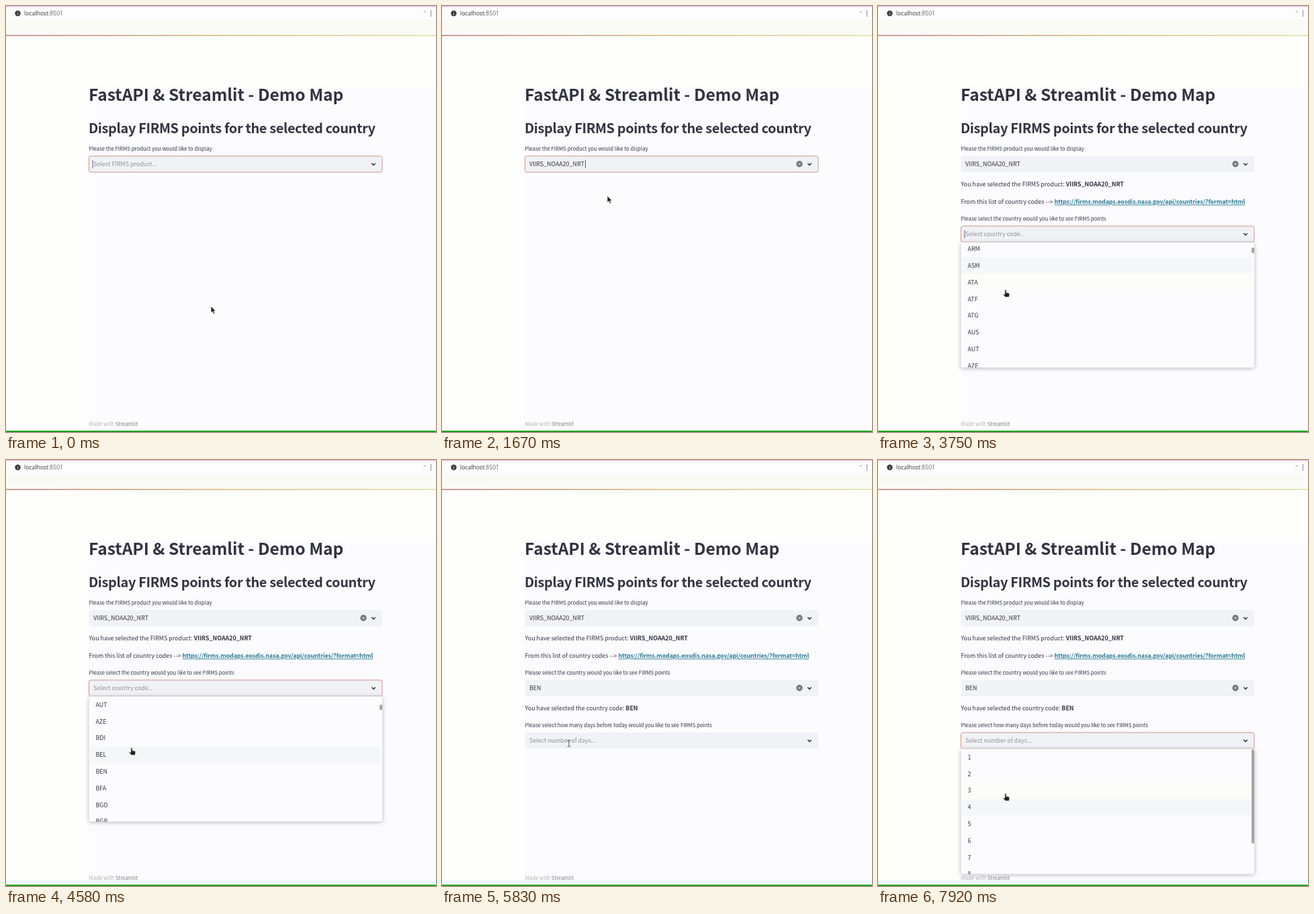
These frames come from a looping animation (640 by 633 pixels, 8000 ms). An HTML page:

```html
<!DOCTYPE html>
<html lang="en">
<head>
<meta charset="utf-8">
<title>Demo Map</title>
<style>
  html, body { margin: 0; width: 100%; height: 100%; overflow: hidden; background: #fcfcff; }
  #stage { display: block; width: 100vw; height: 100vh; }
  text { font: 8.88px "Noto Sans CJK JP", "Noto Sans CJK SC", "Noto Sans CJK", sans-serif; fill: #31333f; }
  .bold { font-weight: 700; }
  .title { font-size: 24.5px; font-weight: 700; }
  .heading { font-size: 19.9px; font-weight: 600; letter-spacing: -.017em; }
  .label { font-size: 7.77px; }
  .placeholder { fill: #8e9098; }
  .link { font-weight: 700; letter-spacing: -.0135em; fill: #2b7a93; text-decoration: underline; }
  .address { font: 8.6px "Open Sans", "Noto Sans", sans-serif; fill: #333; }
  .panel { filter: drop-shadow(0 1px 3px #b4b4b8); }
</style>
</head>
<body>
<svg id="stage" viewBox="0 0 640 633" preserveAspectRatio="none">
  <linearGradient id="accent">
    <stop stop-color="#b98078"/><stop offset=".5" stop-color="#d8b878"/><stop offset="1" stop-color="#e2e0a0"/>
  </linearGradient>
  <rect width="640" height="633" fill="#fcfcff"/>
  <path d="M0 45H640V120H123V633H0z" fill="#fefefd"/>
  <rect width="640" height="20" fill="#fdfdfd"/>
  <rect y="20" width="640" height="23" fill="#fafaf7"/>
  <rect y="43" width="640" height="1.5" fill="url(#accent)"/>
  <rect width="640" height="1" fill="#f3a5f0"/>
  <circle cx="17.5" cy="11" r="4.2" fill="#3a3a3c"/>
  <path d="M17.5 8.5v1M17.5 10.5v3" stroke="#ddd" fill="none"/>
  <text class="address" x="27" y="14">localhost<tspan fill="#666">:8501</tspan></text>
  <path d="M621.5 9.5l1.5-1.5 1.5 1.5M632.5 6v10" stroke="#777" stroke-width=".8" fill="none"/>
  <text class="title" x="123" y="141">FastAPI &amp; Streamlit - Demo Map</text>
  <text class="heading" x="123" y="189">Display FIRMS points for the selected country</text>
  <text class="label" x="123.5" y="624"><tspan fill="#b2b2b6">Made with </tspan><tspan fill="#808085" font-weight="500">Streamlit</tspan></text>
  <g id="app"></g>
  <rect y="631" width="640" height="2" fill="#1f9f1f"/>
</svg>
<script>
const LOOP = 8000, ROW = 24.8, VIEW = 186, LEFT = 123.5, WIDTH = 436.5;
const PRODUCT = "VIIRS_NOAA20_NRT", FIELD = "#f0f2f6";

const selects = [
  { y: 235, from: 0, open: 650, pick: 1500, done: 1850, value: PRODUCT,
    label: "Please the FIRMS product you would like to display",
    hint: "Select FIRMS product...",
    options: ["MODIS_NRT", PRODUCT, "VIIRS_SNPP_NRT"], total: 3 },
  { y: 339, from: 1850, open: 2430, pick: 5050, done: 5300, value: "BEN",
    label: "Please select the country would you like to see FIRMS points",
    hint: "Select country code...",
    options: ("ABW AFG AGO AIA ALA ALB AND ARE ARG ARM ASM ATA ATF ATG AUS AUT AZE " +
              "BDI BEL BEN BFA BGD BGR BHR BHS").split(" "), total: 249 },
  { y: 417, from: 5300, open: 5980, pick: Infinity, done: Infinity,
    label: "Please select how many days before today would you like to see FIRMS points",
    hint: "Select number of days...",
    options: Array.from({ length: 10 }, (_, i) => i + 1), total: 10 },
];

// [time, x, y]
const cursorPath = [
  [0, 305, 446], [150, 305, 446], [550, 270, 238], [850, 262, 238], [1250, 246, 286],
  [1500, 246, 284], [1670, 246, 282], [1950, 240, 285], [2300, 200, 341], [2460, 198, 341],
  [2700, 190, 417], [2830, 190, 418], [4300, 190, 424], [4580, 187, 428], [4850, 187, 461],
  [5050, 187, 461], [5450, 189, 423], [5950, 189, 421], [6250, 215, 460], [6750, 220, 466],
  [7100, 220, 468], [7500, 200, 515], [7780, 194, 512], [7920, 190, 496], [8000, 190, 494],
];

const ease = (t, a, b) => {
  const u = Math.min(1, Math.max(0, (t - a) / (b - a)));
  return u * u * (3 - 2 * u);
};

function cursorAt(t) {
  const i = Math.max(1, cursorPath.findIndex(p => p[0] > t));
  const [t0, x0, y0] = cursorPath[i - 1], [t1, x1, y1] = cursorPath[i];
  const k = ease(t, t0, t1);
  return { x: x0 + (x1 - x0) * k, y: y0 + (y1 - y0) * k };
}

const listTop = s => s.y + 12.3;
const listHeight = s => Math.min(VIEW, s.total * ROW);
const isOpen = (s, t) => t >= s.open && t < s.pick;
const idleHover = t => t > 6200 && t < 7150;

function scrollOf(s, t) {
  if (s.total === 249) return 15 * ROW * ease(t, 2950, 4350);
  if (s.total === 10) return (10 * ROW - VIEW) * (ease(t, 6250, 6600) - ease(t, 7000, 7300));
  return 0;
}

function hoverRow(s, t) {
  const { y } = cursorAt(t), offset = y - listTop(s);
  if (!isOpen(s, t) || idleHover(t) || offset < 0 || offset > listHeight(s)) return -1;
  return Math.floor((offset + scrollOf(s, t)) / ROW);
}

const text = (x, y, content, cls = "") => `<text x="${x}" y="${y}" class="${cls}">${content}</text>`;
const rect = (x, y, w, h, fill, extra = "") =>
  `<rect x="${x}" y="${y}" width="${w}" height="${h}" fill="${fill}" ${extra}/>`;

function field(s, t) {
  const focused = (t >= s.open || s.from === 0) && t < s.done;
  const picked = t >= s.pick;
  const border = focused ? 'stroke="#d4918c"' : "";
  let out = text(LEFT, s.y - 19.7, s.label, "label")
    + rect(LEFT, s.y - 12, WIDTH, 24, FIELD, `rx="3" ${border}`)
    + text(130, s.y + 3.3, picked ? s.value : s.hint, picked ? "" : "placeholder")
    + `<path d="M544.3 ${s.y - 1.3}l2.7 2.7 2.7-2.7" fill="none" stroke="#31333f" stroke-width="1.5"/>`;
  if (picked) out += `<circle cx="532" cy="${s.y - .3}" r="4.7" fill="#73757e"/>
    <path d="M530.4 ${s.y - 1.9}l3.2 3.2m0-3.2l-3.2 3.2" stroke="${FIELD}"/>`;
  const focusTime = picked ? s.pick : s.from === 0 && t < s.open ? 0 : s.open;
  if (focused && (t - focusTime) % 1200 < 600)
    out += rect(picked ? (s.total === 3 ? 213 : 149) : 128.5, s.y - 6, 1, 12, "#60626c");
  return out;
}

function list(s, t) {
  const top = listTop(s), height = listHeight(s), scroll = scrollOf(s, t);
  const now = hoverRow(s, t), before = hoverRow(s, t - 110);
  const rows = s.options.map((option, i) => {
    const y = i * ROW - scroll;
    const fill = i === before ? "#f3f7f8" : i === now ? "#fcfcf8" : "none";
    return rect(0, y, 433, ROW, fill) + text(10, y + 15.6, option);
  }).join("");
  const thumb = Math.max(8, VIEW * VIEW / (s.total * ROW));
  const bar = s.total * ROW > VIEW
    ? rect(432.5, 1 + scroll / (s.total * ROW) * VIEW, 4, thumb, "#a6a6a8", 'rx="1.5"') : "";
  return rect(LEFT, top, WIDTH, height, "#fcfcff", 'rx="3" class="panel"')
    + `<svg x="${LEFT}" y="${top}" width="${WIDTH}" height="${height}" overflow="hidden">${rows}${bar}</svg>`;
}

const shapes = {
  arrow: `<path d="M0 0V10L2.3 8L4 11.8L5.8 11L4.2 7.4H7.2z" fill="#222" stroke="#fff" stroke-width=".7"/>`,
  hand: `<path d="M-1.2 0Q0-1.2 1 0V3.6L5 4.6Q6 5 5.8 6.2L5 10.5H-.5L-3.8 6.6Q-3.6 5.2-1.2 6.4z" fill="#222" stroke="#fff" stroke-width=".6"/>`,
  beam: `<path d="M-2.5-4.5H-.6L0-4L.6-4.5H2.5M0-4V4M-2.5 4.5H-.6L0 4L.6 4.5H2.5" fill="none" stroke="#555"/>`,
};

function cursor(t, shown) {
  const { x, y } = cursorAt(t);
  const overList = shown.some(s => hoverRow(s, t) >= 0 && hoverRow(s, t) < s.total);
  const covered = shown.some(s => isOpen(s, t) && y > listTop(s));
  const overField = !covered && shown.some(s => Math.abs(y - s.y) < 12);
  const kind = overList ? "hand" : overField ? "beam" : "arrow";
  return `<g transform="translate(${x} ${y})">${shapes[kind]}</g>`;
}

function render(t) {
  const shown = selects.filter(s => t >= s.from);
  let out = shown.map(s => field(s, t)).join("");
  if (t >= selects[0].done)
    out += text(LEFT, 268.3, `You have selected the FIRMS product: <tspan class="bold">${PRODUCT}</tspan>`)
      + text(LEFT, 294.3, `From this list of country codes --&gt; <tspan class="link">https://firms.modaps.eosdis.nasa.gov/api/countries/?format=html</tspan>`);
  if (t >= selects[1].done)
    out += text(LEFT, 372.4, `You have selected the country code: <tspan class="bold">BEN</tspan>`);
  out += shown.filter(s => isOpen(s, t)).map(s => list(s, t)).join("");
  document.getElementById("app").innerHTML = out + cursor(t, shown);
}

const start = performance.now();
function tick() {
  render((performance.now() - start) % LOOP);
  requestAnimationFrame(tick);
}
tick();
</script>
</body>
</html>
```
